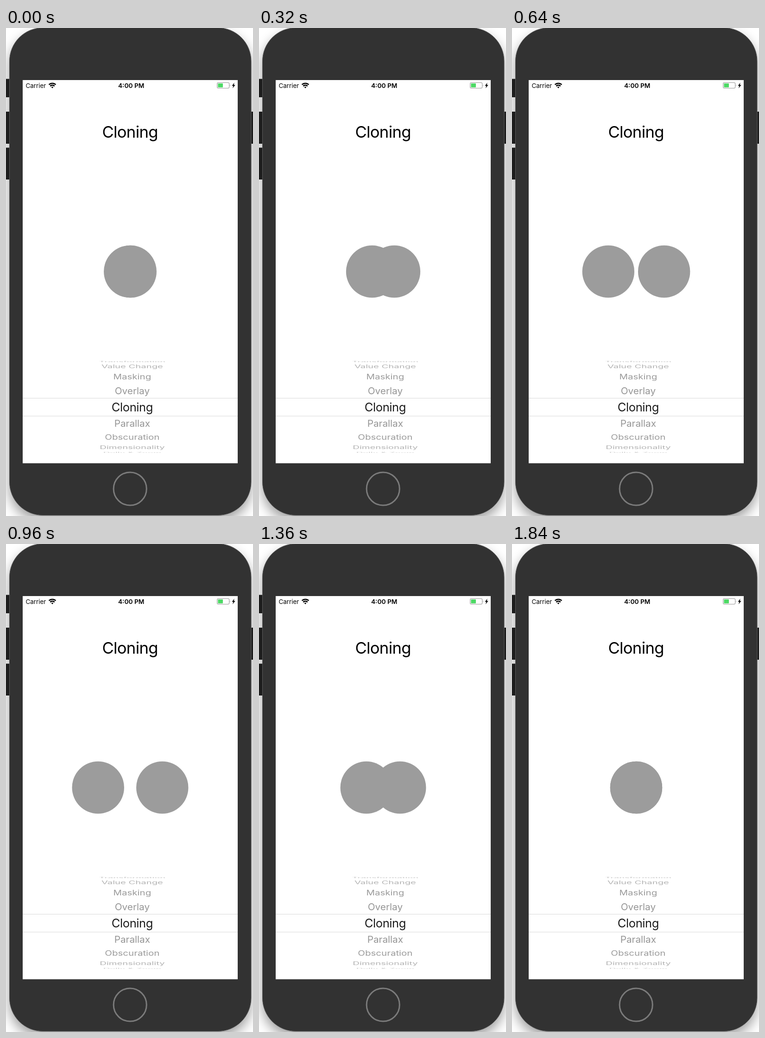
An HTML page for the animation above (1920 ms loop, 533 by 1050 pixels).

```html
<!DOCTYPE html>
<html lang="en">
<head>
<meta charset="utf-8">
<title>Cloning</title>
<style>
  html, body { margin: 0; width: 100%; height: 100%; overflow: hidden; background: #fff; }
  svg { display: block; width: 100%; height: 100%; }
  text { font-family: Inter, "Liberation Sans", sans-serif; }
  .mid { text-anchor: middle; }
</style>
</head>
<body>
<svg viewBox="0 0 533 1050">
  <defs>
    <filter id="blur" x="-20%" y="-20%" width="140%" height="140%"><feGaussianBlur stdDeviation="13"/></filter>
    <clipPath id="wheelClip"><rect x="36" y="714.5" width="464" height="199.5"/></clipPath>
  </defs>

  <rect x="7" y="12" width="522" height="1049" rx="72" fill="#000" opacity=".38" filter="url(#blur)"/>
  <g fill="#1d1d1d">
    <rect x="-3" y="109.5" width="13" height="39.5" rx="2"/>
    <rect x="-3" y="180" width="13" height="69" rx="2"/>
    <rect x="-3" y="257.5" width="13" height="68.5" rx="2"/>
    <rect x="526" y="180" width="12" height="69" rx="2"/>
  </g>
  <rect x="7.5" y="-.5" width="521.5" height="1049" rx="72" fill="#323232" stroke="#5c5c5c"/>
  <rect x="36" y="112" width="464" height="824.5" fill="#fff"/>
  <circle cx="267.7" cy="991.5" r="35.6" fill="none" stroke="#7b7b7b" stroke-width="3"/>

  <text x="42.5" y="128.7" font-size="13.4">Carrier</text>
  <g fill="none" stroke="#000" stroke-width="2.5">
    <path d="M92.6 121.9a10.6 10.6 0 0 1 14.8 0M95.3 125a6.6 6.6 0 0 1 9.4 0"/>
    <path d="M100 129.8l-2.3-2.5a3.4 3.4 0 0 1 4.6 0z" fill="#000" stroke="none"/>
  </g>
  <text class="mid" x="270.2" y="128.7" font-size="13.7" font-weight="600">4:00 PM</text>
  <rect x="455.7" y="117.5" width="26" height="12" rx="2.5" fill="none" stroke="#999" stroke-width="1.1"/>
  <rect x="457.4" y="119.2" width="10.6" height="8.6" rx=".8" fill="#4cd964"/>
  <path d="M483 121.5q1.5 2 0 4z" fill="#999"/>
  <path d="M492.8 117.5l-5.3 7h3l-1.6 5.3 5.8-7.3h-3.2z"/>

  <text class="mid" x="267.6" y="236.3" font-size="34.5" letter-spacing="-.6">Cloning</text>
  <g fill="#9c9c9c">
    <circle id="left" cx="268" cy="524" r="56.2"/>
    <circle id="right" cx="268" cy="524" r="56.2"/>
  </g>

  <path d="M36 796.5H500M36 835H500" stroke="#d9d9d9"/>
  <g id="wheel" clip-path="url(#wheelClip)"></g>
</svg>
<script>
  const $ = id => document.getElementById(id);

  // Picker rows sit on a cylinder and are squashed towards its rims.
  const rows = ['Transformation', 'Value Change', 'Masking', 'Overlay', 'Cloning',
    'Parallax', 'Obscuration', 'Dimensionality', 'Dolly &amp; Zoom'];
  const shades = ['#1c1c1c', '#959595', '#9b9b9b', '#b3b3b3', '#c4c4c4'];
  const RADIUS = 99, ROW_ANGLE = 20.5 * Math.PI / 180;

  $('wheel').innerHTML = rows.map((label, i) => {
    const row = i - 4, angle = row * ROW_ANGLE;
    const y = 815.8 + RADIUS * Math.sin(angle);
    const size = row ? 21 - 0.25 * Math.abs(row) : 25.5;
    return `<text class="mid" transform="translate(272.4 ${y}) scale(1 ${Math.cos(angle)})"
      y="${size * 0.364}" font-size="${size}" letter-spacing="${row ? 0 : -0.4}"
      fill="${shades[Math.abs(row)]}">${label}</text>`;
  }).join('');

  const LOOP = 1920, STEP = 80, LEAD = 70, SPREAD = 70;

  // cubic-bezier(.42, 0, .58, 1)
  function easeInOut(x) {
    let lo = 0, hi = 1;
    for (let i = 0; i < 24; i++) {
      const s = (lo + hi) / 2, r = 1 - s;
      if (1.26 * r * r * s + 1.74 * r * s * s + s ** 3 < x) lo = s; else hi = s;
    }
    return lo * lo * (3 - 2 * lo);
  }

  function draw(ms) {
    const time = Math.floor(ms / STEP) * STEP;
    const phase = (time + LEAD) % LOOP / (LOOP / 2);
    const offset = SPREAD * easeInOut(phase < 1 ? phase : 2 - phase);
    $('left').setAttribute('cx', 268 - offset);
    $('right').setAttribute('cx', 268 + offset);
  }

  const start = performance.now();
  function tick(now) {
    draw(Math.max(0, now - start));
    requestAnimationFrame(tick);
  }
  draw(0);
  requestAnimationFrame(tick);
</script>
</body>
</html>
```
